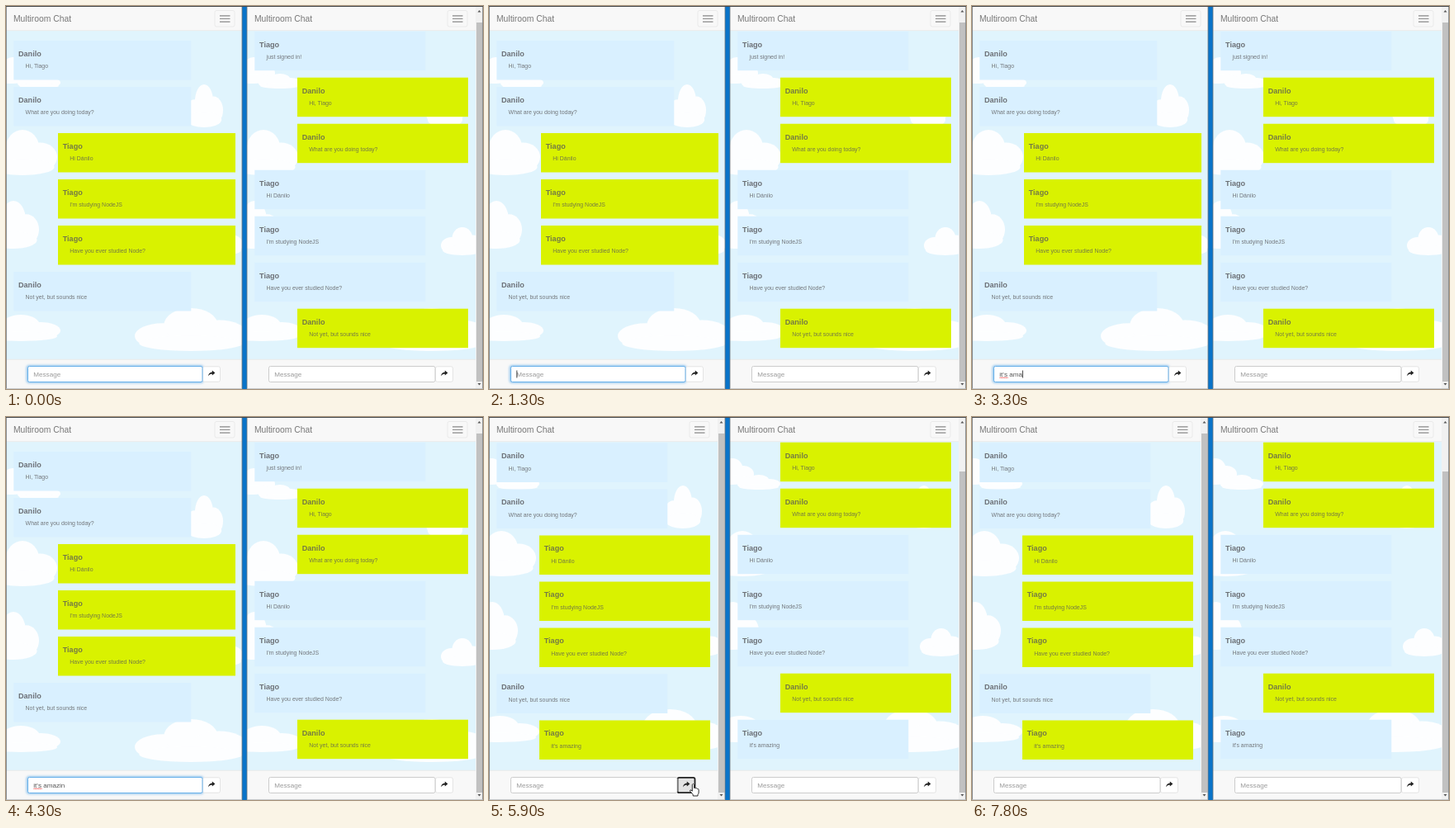
Recreate the animation shown at these times as an HTML page. Size 578x464 px, loop 7900 ms.

```html
<!DOCTYPE html>
<html lang="en">
<head>
<meta charset="utf-8">
<title>Multiroom Chat</title>
<style>
  html, body { margin: 0; width: 100%; height: 100%; overflow: hidden; background: #f8f8f8; }
  svg { display: block; width: 578px; height: 464px; }
  text { font-family: "Liberation Sans", Arial, sans-serif; white-space: pre; }
  .title { font-size: 10.35px; fill: #777; }
  .name { font-size: 9.1px; font-weight: bold; fill: #6c7075; }
  .msg { font-size: 6.96px; fill: #73777a; }
  .mine .name { fill: #747a45; }
  .mine .msg { fill: #747a45; }
  .field { font-size: 8.1px; fill: #555; }
  .hint { fill: #999; }
  .button { fill: #fff; stroke: #e4e4e4; }
  .hover .button { fill: #e6e6e6; stroke: #adadad; }
  .pressed .button { fill: #d4d4d4; stroke: #333; stroke-width: 1.8; }
  .focused .button { fill: #e3e3e3; stroke: #222; stroke-width: 1.8; }
</style>
</head>
<body>
<svg viewBox="0 0 578 464">
  <defs>
    <clipPath id="page"><rect y="30" width="286" height="398"/></clipPath>
    <filter id="glow" x="-10%" y="-50%" width="120%" height="200%"><feGaussianBlur stdDeviation="1.5"/></filter>
  </defs>
  <g id="before"></g>
  <g id="after"></g>
  <rect x="286" width="6" height="464" fill="#0a74c9"/>
  <path d="M.5 0V464M286 0V464M292 0V464M577.6 0V464" stroke="#70767c" stroke-width=".8"/>
  <path d="M0 .5H578" stroke="#45484b"/>
  <path d="M0 463.6H286M292 463.6H578" stroke="#b5b9bc" stroke-width=".8"/>
  <path id="hand" fill="#fff" stroke="#111" stroke-width=".9" stroke-linejoin="round"
    d="M-1.2 .8Q0-.8 1.1 .8V5Q2.2 4.2 3.1 5.3Q4.3 4.8 5 6Q6.4 5.6 6.6 7.2V10.5Q6.5 12 5.5 13V14.5H-.3V13L-3.8 8.8Q-4.2 7.2-2.7 7.4L-1.2 8.7Z"/>
</svg>
<script>
const LOOP = 7900, SENT = 5900, PITCH = 56;
const DRAFT = "it's amazing";
const KEYS = [1500, 1700, 1900, 2100, 2300, 2800, 3000, 3200, 3400, 3500, 3700, 4500];
const A = "Danilo", B = "Tiago";
const CHAT = [
  [B, "just signed in!"],
  [A, "Hi, Tiago"],
  [A, "What are you doing today?"],
  [B, "Hi Dánilo"],
  [B, "I'm studying NodeJS"],
  [B, "Have you ever studied Node?"],
  [A, "Not yet, but sounds nice"],
  [B, DRAFT]
];
const CLOUDS = [
  [-18, 62, 52, 32], [14, 82, 52, 18], [217, 95, 46, 52], [-22, 150, 84, 55],
  [-22, 236, 62, 58], [235, 268, 52, 34], [-30, 374, 96, 32], [156, 366, 136, 52]
];

const $ = id => document.getElementById(id);
const rect = (x, y, w, h, extra) => `<rect x="${x}" y="${y}" width="${w}" height="${h}" ${extra}/>`;
const text = (x, y, cls, s) => `<text x="${x}" y="${y}" class="${cls}">${s}</text>`;

function cloud([x, y, w, h]) {
  const puff = (u, v, rx, ry) =>
    `<ellipse cx="${x + u * w}" cy="${y + v * h}" rx="${rx * w}" ry="${ry * h}"/>`;
  return puff(.25, .65, .25, .3) + puff(.5, .4, .24, .4) + puff(.75, .6, .25, .32) + puff(.5, .82, .46, .18);
}

function bubble([name, msg], x, y, w, mine) {
  return `<g class="${mine ? "mine" : ""}">` +
    rect(x, y, w, 47.5, `fill="${mine ? "#d9f200" : "#d9f0ff"}"`) +
    text(x + 5.7, y + 18.8, "name", name) +
    text(x + 14.3, y + 33, "msg", msg) + "</g>";
}

function scrollbar(x, thumb) {
  return rect(x, 0, 9, 464, 'fill="#f1f1f1"') +
    rect(x + 1, thumb, 7.5, 455 - thumb, 'fill="#c1c1c1"') +
    `<path d="M${x + 2.5} 7.5l2-2.5 2 2.5zM${x + 2.5} 457l2 2.5 2-2.5z" fill="#555"/>`;
}

function form(x, w, focus, id) {
  const glow = focus ? rect(x, 436.5, w, 19, 'rx="2" fill="none" stroke="#66afe9" stroke-width="2" filter="url(#glow)"') : "";
  const bx = x + w;
  return `<g id="${id}">` + glow +
    rect(bx + .5, 436.8, 21, 18.4, 'rx="2" class="button"') +
    rect(x + .5, 436.5, w - .5, 19, `rx="2" fill="#fff" stroke="${focus ? "#66afe9" : "#ccc"}"`) +
    `<path transform="translate(${bx + 7} 441.6)" d="M4.8 0L8.4 3 4.8 6V4.2C3 4.2 1.5 4.7 0 6.8C.3 3.8 2 1.9 4.8 1.8Z" fill="#222"/></g>` +
    text(x + 7.3, 448.8, "field hint", "Message");
}

// One browser window: me = whose view, list = visible messages, top = y of the first bubble.
function pane(o) {
  const { x, me, list, top, wide, thumb, drift } = o;
  const width = wide ? 286 : 277;
  const menu = wide ? 259 : 249;
  const bubbleW = wide ? 215 : 207;
  const mineX = wide ? 63 : 61;
  const posts = list.map((m, i) => {
    const mine = m[0] === me;
    return bubble(m, mine ? mineX : 9.3, top + i * PITCH, bubbleW, mine);
  }).join("");
  return `<g transform="translate(${x})">` +
    rect(0, 30, 286, 398, 'fill="#e0f4fd"') +
    `<g clip-path="url(#page)"><g fill="#fdfeff" transform="translate(${drift ? "-5 -12" : "0 0"})">` +
    CLOUDS.map(cloud).join("") + "</g>" + posts + "</g>" +
    rect(0, 0, width, 30, 'fill="#f8f8f8"') +
    rect(0, 428, width, 36, 'fill="#f8f8f8"') +
    `<path d="M0 29.7H${width}M0 428.3H${width}" stroke="#e7e7e7" stroke-width=".8"/>` +
    text(9, 19, "title", "Multiroom Chat") +
    rect(menu - 6, 5.5, 24, 19.5, 'rx="2" fill="none" stroke="#e6e6e6" stroke-width=".8"') +
    `<path d="M${menu} 11.8h12.5m-12.5 3.7h12.5m-12.5 3.7h12.5" stroke="#888" stroke-width="1.2"/>` +
    form(26, wide ? 212 : 202, wide, o.id) +
    (wide ? "" : scrollbar(277, thumb)) + "</g>";
}

const right = { x: 292, me: A, top: 30.7 };
$("before").innerHTML =
  pane({ x: 0, me: B, list: CHAT.slice(1, 7), top: 42, wide: true, id: "sender" }) +
  pane({ ...right, list: CHAT.slice(0, 7), thumb: 20, id: "peer" }) +
  '<path id="squiggle" d="M33.5 450.8l1 -1 1 1 1 -1 1 1 1 -1 1 1 1 -1 1 1 1 -1 1 1" fill="none" stroke="#e33" stroke-width=".8"/>' +
  '<path id="caret" stroke="#333" stroke-width=".9"/>';
$("after").innerHTML =
  pane({ x: 0, me: B, list: CHAT.slice(1), top: 31.5, thumb: 20, drift: true, id: "sent" }) +
  pane({ ...right, list: CHAT.slice(1), thumb: 66, drift: true, id: "peerSent" });

const field = $("sender").nextElementSibling;
const show = (el, on) => el.setAttribute("visibility", on ? "visible" : "hidden");
const clamp = v => Math.max(0, Math.min(1, v));

function draw(t) {
  const sent = t >= SENT;
  $("before").style.display = sent ? "none" : "";
  $("after").style.display = sent ? "" : "none";

  const typed = KEYS.filter(k => k <= t).length;
  field.textContent = typed ? DRAFT.slice(0, typed) : "Message";
  field.setAttribute("class", typed ? "field" : "field hint");

  const lastKey = typed ? KEYS[typed - 1] : -700;
  const blurred = t >= 5700;
  const cx = 33.8 + (typed && !sent ? field.getComputedTextLength() : 0);
  $("caret").setAttribute("d", `M${cx} 441.5v9`);
  const writing = !sent && !blurred;
  show($("caret"), writing && (t - lastKey) % 1000 < 500);
  show($("squiggle"), writing && typed > 4);

  $("sender").setAttribute("class", blurred ? "pressed" : t >= 5500 ? "hover" : "");
  $("sent").setAttribute("class", t < 6300 ? "focused" : "");

  // The pointer rises from the bottom edge, clicks, and leaves the same way.
  const away = t < SENT ? 1 - clamp((t - 5200) / 400) : clamp((t - 6000) / 300);
  $("hand").setAttribute("transform", `translate(${247.5 + 12 * away} ${444.5 + 22 * away})`);
  show($("hand"), away < 1);
}

function tick() {
  const t = performance.now() % LOOP;
  draw(Math.floor(t / 100) * 100);
  requestAnimationFrame(tick);
}
tick();
</script>
</body>
</html>
```
